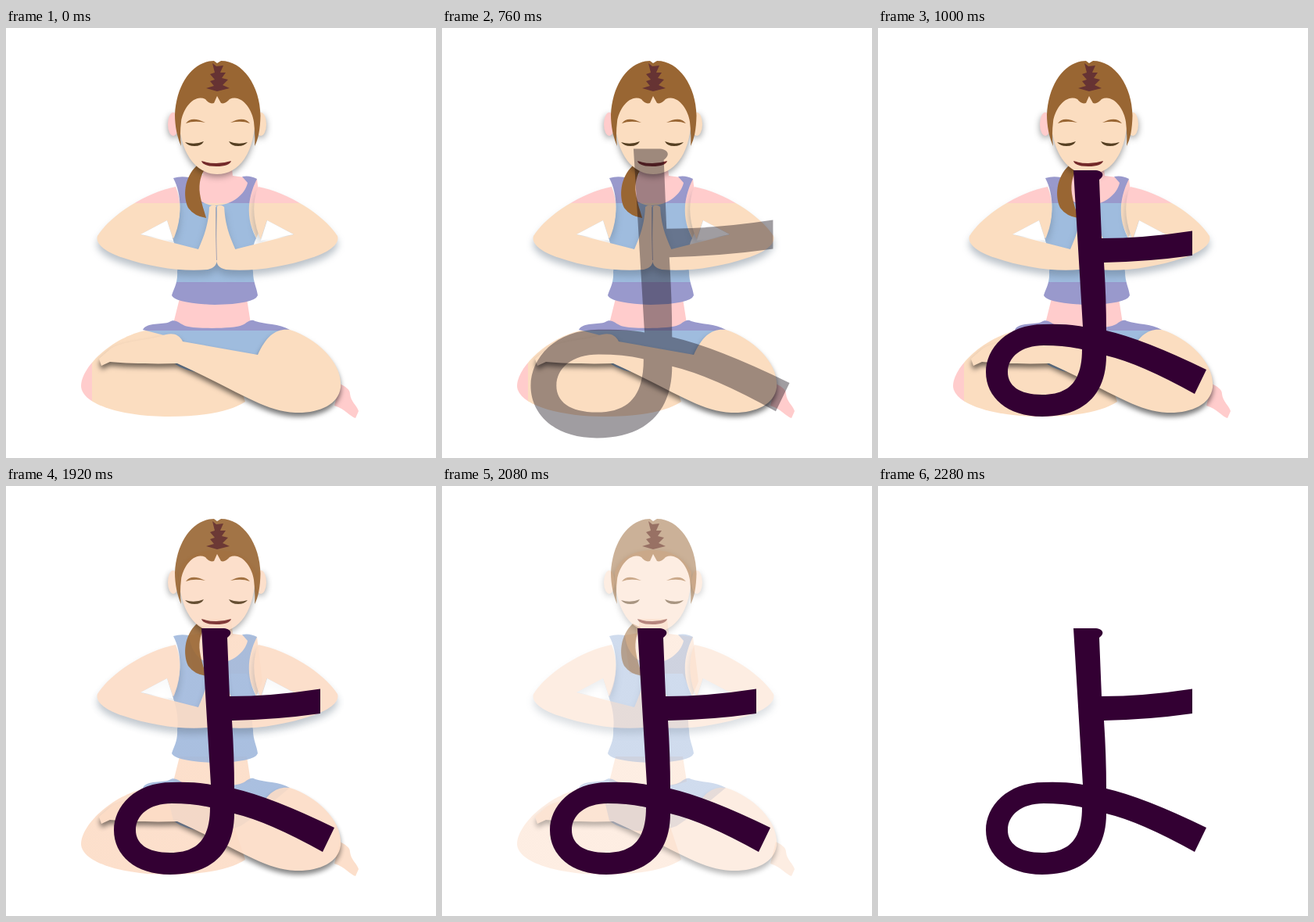
Recreate the animation shown at these times as an HTML page. Size 550 px wide and 550 px high, loop 3.04 s.

```html
<!DOCTYPE html>
<html lang="ja">
<head>
<meta charset="utf-8">
<title>Yoga pose and kana</title>
<style>
  html, body { margin: 0; height: 100%; overflow: hidden; background: #fff; }
  svg { display: block; width: 100vw; height: 100vh; }
  #figure { --pink: #fcc; --peach: #fbddc0; --dark: #99c; --light: #9fbcde; --fade: 1; }
  #figure.fading { --pink: #fcdcc6; --peach: #fcdcc6; --dark: #a0b8dc; --light: #a0b8dc; }
  #figure > * { opacity: var(--fade); }
  .skin { fill: url(#skin); }
  .cloth { fill: url(#cloth); }
  .peach { fill: var(--peach); }
  .pink { fill: var(--pink); }
  .hair { fill: #963; }
  .pink-stop { stop-color: var(--pink); }
  .peach-stop { stop-color: var(--peach); }
  .dark-stop { stop-color: var(--dark); }
  .light-stop { stop-color: var(--light); }
  .head { filter: drop-shadow(0 3px 4px #0006); }
  .arm { filter: drop-shadow(0 7px 5px #5676); }
  .leg { filter: drop-shadow(0 5px 3px #0008); }
</style>
</head>
<body>
<svg viewBox="0 0 550 550">
  <g id="figure">
    <defs>
      <linearGradient id="skin" gradientUnits="userSpaceOnUse" x1="0" y1="0" x2="0" y2="550">
        <stop class="pink-stop" offset=".4073"/><stop class="peach-stop" offset=".4073"/>
        <stop class="peach-stop" offset=".5909"/><stop class="pink-stop" offset=".5909"/>
      </linearGradient>
      <linearGradient id="cloth" gradientUnits="userSpaceOnUse" x1="0" y1="0" x2="0" y2="550">
        <stop class="dark-stop" offset=".4073"/><stop class="light-stop" offset=".4073"/>
        <stop class="light-stop" offset=".5909"/><stop class="dark-stop" offset=".5909"/>
        <stop class="dark-stop" offset=".7036"/><stop class="light-stop" offset=".7036"/>
      </linearGradient>
      <linearGradient id="knee" gradientUnits="userSpaceOnUse" x1="0" y1="0" x2="550" y2="0">
        <stop class="pink-stop" offset=".2"/><stop class="peach-stop" offset=".2"/>
      </linearGradient>
    </defs>

    <path class="skin" d="M222 346L214 378Q267 394 313 378L308 346Z"/>
    <path class="pink" d="M427 455C433 458 440 462 440 468C441 478 449 483 451 490L447 499C440 497 435 488 420 483Z"/>
    <path fill="url(#knee)" d="M184 386C140 392 96 432 96 458C97 482 150 497 208 497C255 497 288 490 306 478L290 430L226 392Z"/>
    <path class="cloth" d="M175 386C180 376 200 380 209 376C216 371 222 378 229 381C240 385 292 385 302 380C309 377 312 371 319 375C330 379 350 378 363 386L322 420L300 435C270 446 232 443 214 428L206 394Z"/>
    <path class="peach leg" d="M119 423L134 410C150 400 178 400 198 394C212 389 221 391 226 401L322 418C333 394 345 384 363 386C400 398 431 430 428 460C425 482 400 493 370 492C330 490 300 466 219 429C190 430 155 429 133 427L122 432Z"/>

    <path class="skin" d="M252 170H288L290 189L321 193L328 250L320 269L308 240H240L233 191L252 188Z"/>
    <path class="cloth" d="M214 192Q223 189 234 191C236 212 249 227 267 227C290 227 306 212 309 198L302 190Q312 188 321 193C307 221 308 246 320 269C314 280 314 300 316 312C316 325 321 333 322 342Q318 353 267 354Q216 352 212 342C215 333 220 325 219 312C221 298 218 282 213 269C225 244 226 215 214 192Z"/>
    <g class="arm">
      <path id="arm" class="skin" d="M217 203C178 211 134 239 117 266C114 275 125 286 150 294C185 306 225 312 258 309C267 307 270 302 270 295L269 228Q264 225 260 229C259 250 254 265 246 283L172 264L206 246L214 270C223 250 226 225 217 203Z"/>
      <use href="#arm" transform="matrix(-1.013 0 0 1 542.5 0)"/>
      <path d="M268.500 229Q268 265 269.500 297" fill="none" stroke="#a9a6b4"/>
    </g>
    <path fill="#fff" d="M172 264L206 246L214 272ZM368 264L334 246L326 272Z"/>

    <path class="hair" d="M244 176C228 191 226 215 233 230Q241 241 256 243C254 235 250 225 248 212C246 198 250 187 254 181Z"/>
    <g class="head peach">
      <ellipse class="pink" cx="214" cy="123" rx="7" ry="15"/>
      <ellipse cx="326" cy="123" rx="7" ry="15"/>
      <path d="M221 110C221 160 243 187 270 187C298 187 319 160 319 110Q305 82 270 82Q232 82 221 110Z"/>
    </g>
    <g class="hair">
      <path d="M224 151C219 140 216 125 216 111C218 70 240 42 266 42L270 45L275 42C303 42 325 74 325.500 112Q325 138 318 151Q319 136 317 120C315 104 301 84 286 91Q280 98 275 96L270 87L266 96Q260 98 255 91C240 84 226 104 224 120Q222 136 224 151Z"/>
      <path d="M230 122Q237 112 255 121Q240 118 230 122ZM287 121Q304 112 312 122Q302 118 287 121Z"/>
    </g>
    <path fill="#633" d="M264 45L269 49L278 48L274 57L281 57L276 64L284 66L277 73L286 77L270 81L256 77L266 74L261 68L267 66L261 59L267 57Z"/>
    <path fill="#553f22" d="M229 146Q241 150 253 145Q250 151 241 151Q233 151 229 146ZM285 145Q297 150 309 146Q305 151 297 151Q288 151 285 145Z"/>
    <path fill="#732a2a" d="M250 170Q269 176 288 170Q286 177 269 177Q252 177 250 170Z"/>
  </g>

  <path id="kana" fill-rule="evenodd" d="M250 182H279C287 183 291 188 283 194L286 269Q340 269 402 259.500V291Q345 299 289 300Q292 345 292 387Q340 398 420 437L405 468Q335 429 292 419C292 470 262 497 210 497C165 497 138 472 138 440C138 410 165 379 212 379Q241 378 262 382ZM261 411Q240 406 212 406C183 406 166 421 166 440C166 457 180 469 210 469C245 469 261 451 261 411Z"/>
</svg>
<script>
  const LOOP = 3040, STEP = 40, STEPS = 10;
  const figure = document.getElementById("figure");
  const kana = document.getElementById("kana");

  // Progress from 0 to 1 in ten visible steps; the first shows at `start`.
  const stepped = (time, start) =>
    Math.min(STEPS, Math.max(0, Math.floor((time - start) / STEP) + 1)) / STEPS;

  function draw(now) {
    const time = now % LOOP;
    const shown = stepped(time, 640);
    const gone = stepped(time, 1920);
    const scale = 1 + 0.29 * (1 - shown);

    kana.setAttribute("opacity", shown);
    kana.setAttribute("fill", shown < 1 ? "#120a14" : "#303");
    kana.setAttribute("transform",
      `translate(279 339.5) scale(${scale}) translate(-279 -339.5)`);
    figure.classList.toggle("fading", gone > 0);
    figure.style.setProperty("--fade", 1 - gone);
  }

  const start = performance.now();
  function tick() {
    draw(performance.now() - start);
    requestAnimationFrame(tick);
  }
  tick();
</script>
</body>
</html>
```
